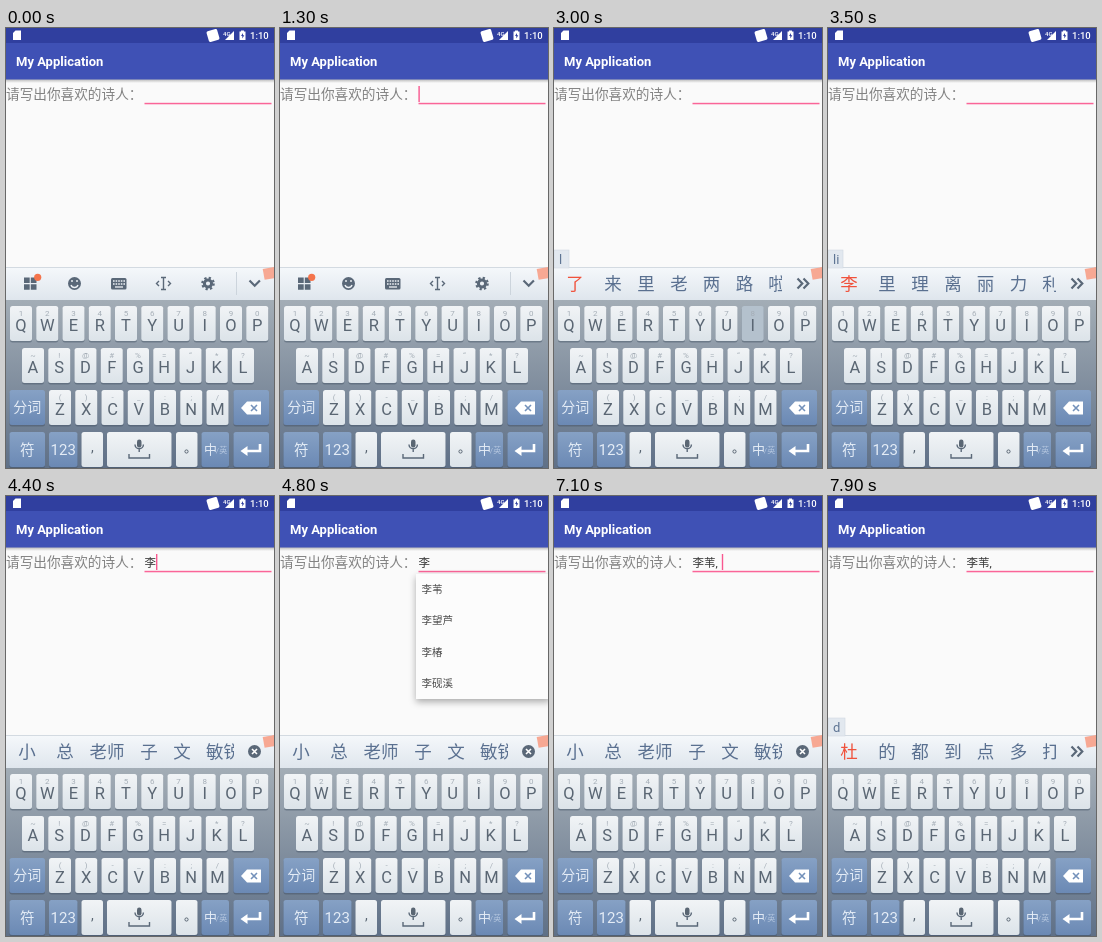
Animation of 268 by 440 pixels, one loop 8000 ms. Source, as an HTML page:

```html
<!DOCTYPE html>
<html lang="zh-CN">
<head>
<meta charset="utf-8">
<title>Autocomplete demo</title>
<style>
html, body { margin: 0; width: 100%; height: 100%; overflow: hidden; background: #fafafa; }
svg { display: block; width: 100vw; height: 100vh; }
text { font-family: Roboto, "Noto Sans CJK SC", "Noto Sans CJK", sans-serif; white-space: pre; }
.mid { text-anchor: middle; }
.line { fill: none; stroke: #5a6878; stroke-width: 2.2; }
.thin { stroke-width: 1.4; }
.icon { fill: #5a6878; }
.white { fill: #fff; }
</style>
</head>
<body>
<svg id="stage" viewBox="0 0 268 440">
  <defs>
    <linearGradient id="board" x2="0" y2="1"><stop stop-color="#a3adb6"/><stop offset="1" stop-color="#5f7087"/></linearGradient>
    <linearGradient id="strip" x2="0" y2="1"><stop stop-color="#f5f8fb"/><stop offset="1" stop-color="#dfe6ed"/></linearGradient>
    <linearGradient id="light" x2="0" y2="1"><stop stop-color="#f1f4f6"/><stop offset="1" stop-color="#dce3e9"/></linearGradient>
    <linearGradient id="blue" x2="0" y2="1"><stop stop-color="#86a1c5"/><stop offset="1" stop-color="#6b89b4"/></linearGradient>
    <linearGradient id="shade" x2="0" y2="1"><stop stop-color="#000" stop-opacity=".28"/><stop offset="1" stop-color="#000" stop-opacity="0"/></linearGradient>
    <filter id="drop" x="-20%" y="-20%" width="140%" height="140%"><feDropShadow dx="0" dy="3" stdDeviation="3.5" flood-opacity=".32"/></filter>
    <clipPath id="window"><path d="M0 240H228V272H0z"/></clipPath>
  </defs>

  <rect width="268" height="440" fill="#fafafa"/>
  <rect y="51" width="268" height="4" fill="url(#shade)"/>
  <rect width="268" height="15" fill="#303f9f"/>
  <rect y="15" width="268" height="36.5" fill="#3f51b5"/>
  <g class="white">
    <path d="M9.500 2.500H15V12H7V5z"/>
    <rect x="201.500" y="2" width="11" height="11" rx="1.500" transform="rotate(-16 207 7.500)"/>
    <path d="M228 3v9h-9z"/>
    <text x="217" y="7.500" font-size="6" font-weight="500">4G</text>
    <path d="M235 2.500h3v1h1.500V12h-6V3.500h1.500z"/>
    <path d="M237 5l-2 3h1.300v2.500l2-3.300H237z" fill="#303f9f"/>
    <text x="244" y="11" font-size="9.500" font-weight="500">1:10</text>
    <text x="10" y="38.400" font-size="13" font-weight="700">My Application</text>
  </g>

  <text y="70.700" font-size="13.650" fill="#828282">请写出你喜欢的诗人：</text>
  <rect x="138.500" y="74.800" width="127" height="1.500" fill="#fa6598"/>
  <text id="field" x="138.500" y="70.500" font-size="11.500" fill="#333"></text>
  <rect id="caret" y="58" width="1.400" height="16" fill="#f8588f"/>
  <g id="menu"></g>

  <rect y="239" width="268" height="33" fill="url(#strip)"/>
  <path d="M0 239.500H268" stroke="#d3dae1"/>
  <g id="tools">
    <path class="icon" d="M18 249.500h5.700v5.500H18zM24.800 249.500h5.700v5.500h-5.700zM18 256.200h5.700v5.500H18zM24.800 256.200h5.700v5.500h-5.700z"/>
    <circle cx="31.700" cy="249.300" r="3.600" fill="#f4744c"/>
    <circle class="icon" cx="68.500" cy="255.500" r="6.500"/>
    <path d="M65 257a3.700 3.700 0 0 0 7 0M66 252v2M71 252v2" stroke="#eef2f6" stroke-width="1.400" fill="none"/>
    <rect class="icon" x="105" y="250" width="15.500" height="11.500" rx="1.500"/>
    <path d="M107 253h12M107 256h12" stroke="#eef2f6" stroke-width="1.400" stroke-dasharray="1.600 1"/>
    <path d="M109 259h8" stroke="#eef2f6" stroke-width="1.300"/>
    <path class="line thin" d="M155 249.500h5M155 261.500h5M157.500 249.500v12M153 253l-2.500 2.500 2.500 2.500M162 253l2.500 2.500-2.500 2.500"/>
    <circle class="line" cx="202" cy="255.500" r="3.600" style="stroke-width:3"/>
    <circle class="line" cx="202" cy="255.500" r="5.700" stroke-dasharray="2.240"/>
    <path d="M230.500 244v23" stroke="#ccd4dc"/>
    <path class="line" d="M243.500 252.500l5.200 5.200 5.200-5.200"/>
  </g>
  <path id="more" class="line" d="M243.500 250.500l4.800 5-4.800 5M249.500 250.500l4.800 5-4.800 5"/>
  <g id="close">
    <circle class="icon" cx="248.500" cy="255.500" r="6.500"/>
    <path d="M246 253l5 5m0-5l-5 5" stroke="#fff" stroke-width="1.600"/>
  </g>
  <g id="words" clip-path="url(#window)"></g>
  <rect id="pick" y="240" width="43" height="32" fill="#6f8db8" opacity=".25"/>
  <g id="pinyin">
    <rect id="tab" y="222" height="18" fill="#e2e8ef" stroke="#d0d8e0" stroke-width=".6"/>
    <text id="typed" x="5" y="235.500" font-size="13" fill="#5f7594"></text>
  </g>
  <rect x="257.500" y="240" width="12" height="11" fill="#f7a893" transform="rotate(-10 263 245)"/>

  <rect y="272" width="268" height="168" fill="url(#board)"/>
  <g id="keys"></g>
  <g id="bubble" filter="url(#drop)">
    <path d="M-17.500 0h35q2 0 2 2v39q0 2-2 2h-13L0 47l-4.500-4h-13q-2 0-2-2V2q0-2 2-2z" fill="#f6f8fa"/>
    <text id="big" class="mid" y="31" font-size="31" fill="#5b9fe8"></text>
  </g>
</svg>
<script>
const $ = id => document.getElementById(id);
const show = (id, on) => $(id).setAttribute('visibility', on ? 'visible' : 'hidden');
const label = (x, y, size, fill, s) =>
  `<text class="mid" x="${x}" y="${y}" font-size="${size}" fill="${fill}">${s}</text>`;

// Keyboard
const PITCH = 26.25, spots = {}, pale = '#e4ecf6', ink = '#5a6673';
let keys = '';
function key(x, y, w, fill, inner, id = '') {
  keys += `<rect x="${x}" y="${y + 1}" width="${w}" height="35.5" rx="2.5" fill="#3f4d60" opacity=".45"/>
    <rect ${id && `id="key${id}"`} x="${x}" y="${y}" width="${w}" height="35" rx="2.5" fill="url(#${fill})"/>${inner}`;
}
function row(letters, hints, x, y) {
  [...letters].forEach((c, i) => {
    const cx = x + i * PITCH;
    spots[c] = [cx, y];
    key(cx - 11, y, 22, 'light',
      label(cx, y + 9.7, 8, '#a5aeb7', hints[i]) + label(cx, y + 24.6, 16.5, ink, c), c);
  });
}
row('QWERTYUIOP', '1234567890', 15, 278);
row('ASDFGHJKL', '~!@#%=“*?', 27, 320);
row('ZXCVBNM', '()-_:;/', 54, 362);

key(3.5, 362, 35.5, 'blue', label(21.2, 384, 14, pale, '分词'));
key(227.5, 362, 35.5, 'blue',
  `<path d="M235 380l6-6.500h14v13h-14z" fill="#fff"/><path d="M245 377l6 6m0-6l-6 6" stroke="#7391ba" stroke-width="1.6"/>`);
key(3.5, 404, 35.5, 'blue', label(21.2, 427, 14.5, pale, '符'));
key(43, 404, 28.5, 'blue', label(57.2, 427, 15, pale, '123'));
key(75.5, 404, 21.5, 'light', label(86.3, 424, 14, ink, ','));
key(101, 404, 64.5, 'light',
  `<rect x="131" y="411.500" width="4.500" height="8" rx="2.200" fill="${ink}"/>
   <path class="line thin" d="M129 416.500a4.200 4.200 0 0 0 8.400 0M133.200 421v3"/>
   <path class="line thin" d="M123 426v4h20.500v-4"/>`);
key(170, 404, 21.5, 'light',
  `<circle cx="180.500" cy="423.500" r="1.600" fill="none" stroke="${ink}"/>`);
key(195.5, 404, 27.5, 'blue', label(204.5, 426, 13, pale, '中') + label(215.5, 425, 8, '#b4c6df', '/英'));
key(227.5, 404, 35.5, 'blue',
  `<path d="M254 416v7h-14" fill="none" stroke="#fff" stroke-width="2.6"/><path d="M234.500 423l7-5v10z" fill="#fff"/>`);
$('keys').innerHTML = keys;

// Suggestions
const poets = ['李苇', '李望芦', '李椿', '李砚溪'];
$('menu').innerHTML = '<rect x="136" y="78" width="134" height="125" fill="#fcfcfc" filter="url(#drop)"/>' +
  poets.map((p, i) => `<text x="141.5" y="${97 + i * 31.3}" font-size="10.5" fill="#4a4a4a">${p}</text>`).join('');

const centers = [21, 59, 92, 125, 157.5, 190.5, 223];
const nextCenters = [21, 59, 101, 143, 176, 217.5];
const lists = {
  l: ['了', '来', '里', '老', '两', '路', '啦'],
  li: ['李', '里', '理', '离', '丽', '力', '利'],
  d: ['杜', '的', '都', '到', '点', '多', '打'],
  next: ['小', '总', '老师', '子', '文', '敏锐']
};
let current;
function fill(name) {
  if (name === current) return;
  current = name;
  const typing = name && name !== 'next';
  $('words').innerHTML = (lists[name] || []).map((w, i) =>
    label((typing ? centers : nextCenters)[i], 262, 17.5, typing && !i ? '#f0523c' : '#5a7090', w)).join('');
  show('tools', !name);
  show('more', typing);
  show('close', name === 'next');
  show('pinyin', typing);
  $('typed').textContent = typing ? name : '';
  $('tab').setAttribute('width', name === 'd' ? 17 : 15);
}

// Each track lists [start, value]; a value holds until the next start.
const at = (track, t) => track.reduce((v, [s, next]) => t >= s ? next : v, track[0][1]);
const blinks = [400, 800, 1300, 1800, 2400, 3000, 3100, 3500, 4000, 4800, 5300, 5800, 6200, 6600, 7100, 7600];
const strip = [[0, ''], [2500, 'l'], [3100, 'li'], [4400, 'next'], [7900, 'd']];
const field = [[0, ''], [4400, '李'], [6200, poets[0] + ', ']];
const caretX = [[0, 138.4], [4400, 150], [6200, 167.8]];
const pressed = [[0, ''], [2100, 'L'], [2400, ''], [3000, 'I'], [3200, ''], [7700, 'D'], [7900, '']];
const popup = [[0, ''], [2400, 'L'], [2600, ''], [3100, 'I'], [3200, ''], [7800, 'D'], [7900, '']];
const menu = [[0, 0], [4500, .6], [4600, 1], [6200, .4], [6300, 0]];

function draw(now) {
  const t = now % 8000;
  fill(at(strip, t));
  $('field').textContent = at(field, t);
  $('caret').setAttribute('x', at(caretX, t));
  show('caret', blinks.filter(b => b <= t).length % 2);
  $('menu').setAttribute('opacity', at(menu, t));
  show('pick', t >= 4200 && t < 4400);
  const down = at(pressed, t), big = at(popup, t);
  for (const c of 'LID') $('key' + c).setAttribute('fill', c === down ? '#b4c1cd' : 'url(#light)');
  show('bubble', big);
  if (big) {
    const [x, y] = spots[big];
    $('bubble').setAttribute('transform', `translate(${x + .5} ${y - 48})`);
    $('big').textContent = big;
  }
}
const start = performance.now();
(function loop() {
  draw(performance.now() - start);
  requestAnimationFrame(loop);
})();
</script>
</body>
</html>
```
